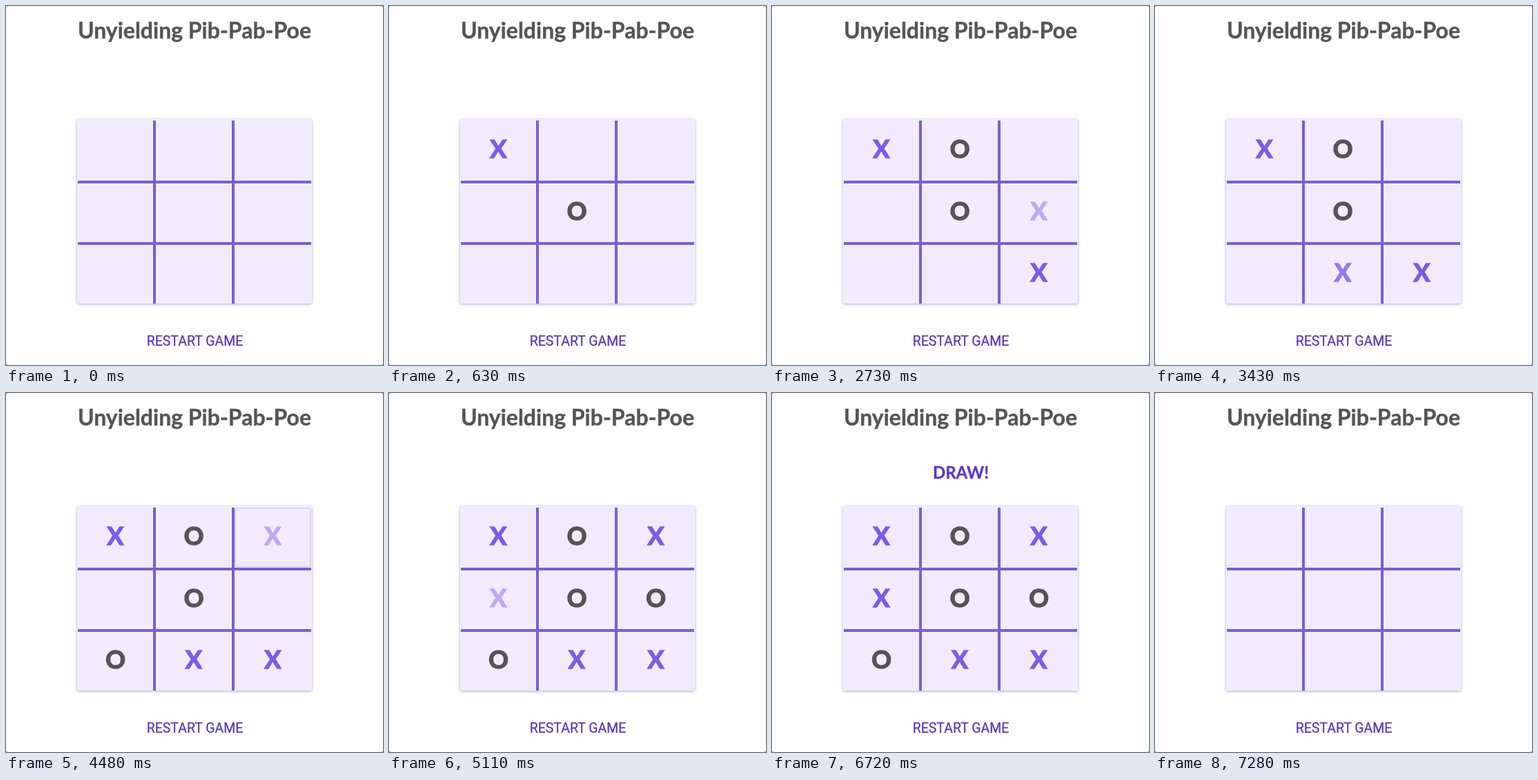
An HTML page that plays this animation: 546 by 520 pixels, repeating every 7420 ms.

```html
<!DOCTYPE html>
<html lang="en">
<head>
<meta charset="utf-8">
<title>Unyielding Pib-Pab-Poe</title>
<style>
  html, body { margin: 0; width: 100%; height: 100%; overflow: hidden; background: #8a8a8a; }
  svg { display: block; width: 546px; height: 520px; }
  text { font-family: Lato, sans-serif; font-weight: 700; text-anchor: middle; }
  .title { font-size: 32px; fill: #555457; stroke: #555457; stroke-width: .4px; }
  .result { font-size: 24px; fill: #5a36cf; stroke: #5a36cf; stroke-width: .3px; }
  .restart { font: 400 19.5px Roboto, sans-serif; fill: #5538b9; stroke: #5538b9; stroke-width: .25px; }
  .board { filter: drop-shadow(0 1px 2px rgba(60, 45, 110, .42)); }
  .grid { stroke: #765fd3; stroke-width: 4; }
  .ring { fill: none; stroke: #dcd4f2; stroke-width: 2; }
  .mark { font-size: 35.5px; stroke-width: 1.6px; }
  .X { fill: #7a5ce8; stroke: #7a5ce8; }
  .O { fill: #555457; stroke: #555457; }
</style>
</head>
<body>
<svg viewBox="0 0 546 520">
  <rect width="546" height="520" rx="3" fill="#fefefe"/>
  <text class="title" x="273" y="47">Unyielding Pib-Pab-Poe</text>
  <text class="result" id="result" x="273.5" y="124">DRAW!</text>
  <rect class="board" id="board" x="103" y="164" width="340" height="267" rx="3"/>
  <rect class="ring" id="ring" x="332" y="167" width="109" height="84.5" rx="3"/>
  <path class="grid" d="M215 166V431M329 166V431M104 255H442M104 344H442"/>
  <g id="marks"></g>
  <text class="restart" x="273.5" y="492">RESTART GAME</text>
</svg>
<script>
const LOOP = 7420, CLEAR = 6790, HOVER = 0.45;
const colX = [158.5, 272, 386.5], rowY = [220, 309.5, 399];
const $ = id => document.getElementById(id);

// Player moves: column, row, hover start, click
const players = [
  [0, 0, 70, 140],
  [2, 2, 1540, 1680],
  [1, 2, 2870, 3360],
  [2, 0, 4200, 4480],
  [0, 1, 4970, 5460]
];
// Replies: column, row, start
const replies = [[1, 1, 420], [1, 0, 1960], [0, 2, 3640], [2, 1, 4760]];

const ramp = (t, start, length) => Math.min(1, Math.max(0, (t - start) / length));
const hover = (t, from) => HOVER * ramp(t, from - 35, 70);

function addMark(symbol, col, row, opacity) {
  const el = document.createElementNS("http://www.w3.org/2000/svg", "text");
  el.setAttribute("class", "mark " + symbol);
  el.setAttribute("x", colX[col]);
  el.setAttribute("y", rowY[row]);
  el.textContent = symbol;
  $("marks").append(el);
  return { el, opacity };
}

const marks = [
  ...players.map(([c, r, over, click]) => addMark("X", c, r,
    t => hover(t, over) + (1 - HOVER) * ramp(t, click + 10, 100))),
  ...replies.map(([c, r, start]) => addMark("O", c, r, t => ramp(t, start, 210))),
  // Pointer passes over this cell without a click
  addMark("X", 2, 1, t => hover(t, 2730 - 35) * (t < 2870))
];

function draw(t) {
  const active = t < CLEAR;
  for (const { el, opacity } of marks) el.style.opacity = active ? opacity(t) : 0;
  $("result").style.opacity = active ? ramp(t, 5480, 100) : 0;
  $("ring").style.opacity = ramp(t, 4200, 140) * (1 - ramp(t, 4550, 140));
  $("board").style.fill = t >= 70 && active ? "#f2ebfe" : "#f0ecfe";
}

const begin = performance.now();
function tick() {
  draw((performance.now() - begin) % LOOP);
  requestAnimationFrame(tick);
}
tick();
</script>
</body>
</html>
```
